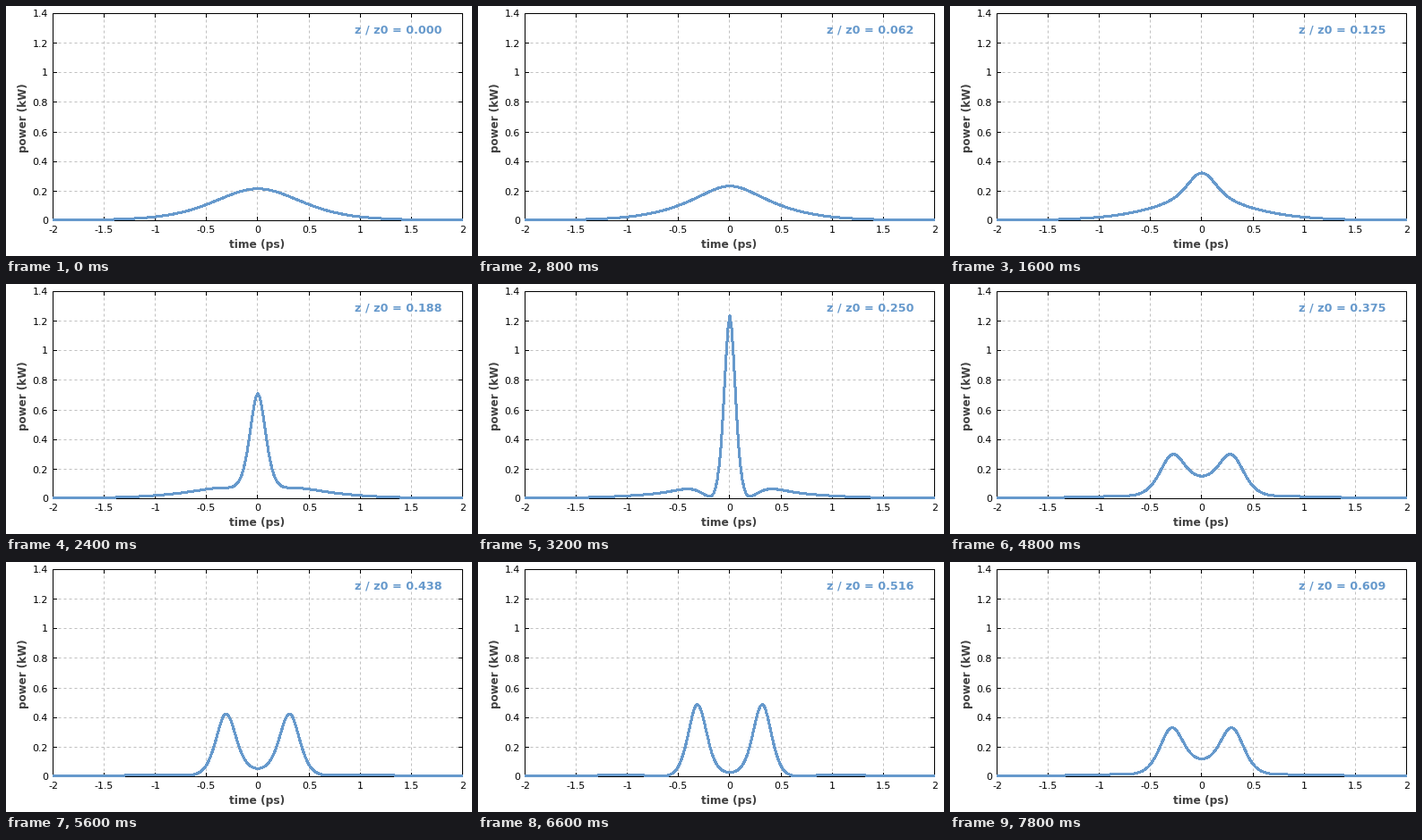
These frames come from a looping animation (520 px wide and 280 px high, 8 s). A matplotlib script:

```python
import numpy as np
import matplotlib.pyplot as plt
from matplotlib.animation import FuncAnimation

W, H, DPI = 520, 280, 80
PX = 72 / DPI                      # points per pixel
LEFT, RIGHT, TOP, BASE = 52, 509, 8, 240
BLUE, GREY, DARK = "#6699cc", "#c0c0c0", "#404040"
FRAMES, STEP_MS = 40, 200
STEPS_PER_PERIOD = 64
ORDER, PEAK_KW, WIDTH_PS = 3, 0.213, 1 / 1.763

plt.rcParams["font.family"] = "DejaVu Sans"


def x_px(t):
    return LEFT + (t + 2) / 4 * (RIGHT - LEFT)


def y_px(p):
    return BASE - p / 1.4 * (BASE - TOP)


def soliton_powers(substeps=120, n=1024, span=40):
    """Split-step propagation of a higher-order soliton over all frames."""
    x = (np.arange(n) - n // 2) * span / n
    k = 2 * np.pi * np.fft.fftfreq(n, span / n)
    dz = np.pi / 2 / STEPS_PER_PERIOD / substeps
    half = np.exp(-0.25j * k**2 * dz)
    u = ORDER / np.cosh(x) + 0j
    powers = []
    for _ in range(FRAMES):
        powers.append(np.abs(u)**2 * PEAK_KW / ORDER**2)
        for _ in range(substeps):
            u = np.fft.ifft(half * np.fft.fft(u))
            u *= np.exp(1j * np.abs(u)**2 * dz)
            u = np.fft.ifft(half * np.fft.fft(u))
    return x * WIDTH_PS, powers


time, powers = soliton_powers()
grid_t = np.linspace(-2, 2, 229)
curves = [y_px(np.interp(grid_t, time, p)) for p in powers]

fig = plt.figure(figsize=(W / DPI, H / DPI), dpi=DPI, facecolor="white")
ax = fig.add_axes([0, 0, 1, 1])
ax.set_xlim(0, W)
ax.set_ylim(H, 0)
ax.axis("off")


def segment(xs, ys, color="black", **kw):
    """One-pixel line through the centres of the given pixels."""
    ax.plot(np.array(xs) + 0.5, np.array(ys) + 0.5, color=color, lw=PX,
            solid_capstyle="projecting", snap=False, **kw)


def label(x, y, s, size, **kw):
    kw = {"ha": "center", "va": "baseline", "color": "black"} | kw
    return ax.text(x, y, s, fontsize=size * PX, **kw)


dash = {"color": GREY, "linestyle": (0, (3, 3)), "zorder": 1}

for t in np.arange(-2, 2.1, 0.5):
    x = round(x_px(t))
    if abs(t) < 2:
        segment([x, x], [BASE, TOP], **dash)
        segment([x, x], [BASE, BASE - 4])
        segment([x, x], [TOP, TOP + 4])
    label(x + 0.5, 254.5, f"{t:g}", 11)

for i in range(8):
    p = i / 5
    y = round(y_px(p))
    if 0 < i < 7:
        segment([LEFT, RIGHT], [y, y], **dash)
        segment([LEFT, LEFT + 4], [y, y])
        segment([RIGHT - 4, RIGHT], [y, y])
    label(47, y + 4.5, f"{p:g}", 11, ha="right")

segment([LEFT, RIGHT, RIGHT, LEFT, LEFT], [BASE, BASE, TOP, TOP, BASE])

bold = {"weight": "bold", "color": DARK}
label(280.5, 271, "time (ps)", 12.3, **bold)
label(19.5, 125, "power (kW)", 11.9, va="center", rotation=90, **bold)

readout = label(486.5, 31, "", 12.75, weight="bold", color=BLUE, ha="right")
# Hard-edged stroke: the axis shows wherever the curve rises half a pixel.
curve, = ax.plot([], [], color=BLUE, lw=2 * PX, zorder=5, snap=False,
                 antialiased=False, solid_capstyle="butt",
                 solid_joinstyle="round")


def draw(i):
    curve.set_data(x_px(grid_t) + 0.5, curves[i])
    readout.set_text(f"z / z0 = {i / STEPS_PER_PERIOD:.3f}")
    return curve, readout


anim = FuncAnimation(fig, draw, frames=FRAMES, interval=STEP_MS, repeat=True,
                     repeat_delay=0, init_func=lambda: draw(0))
plt.show()
```
